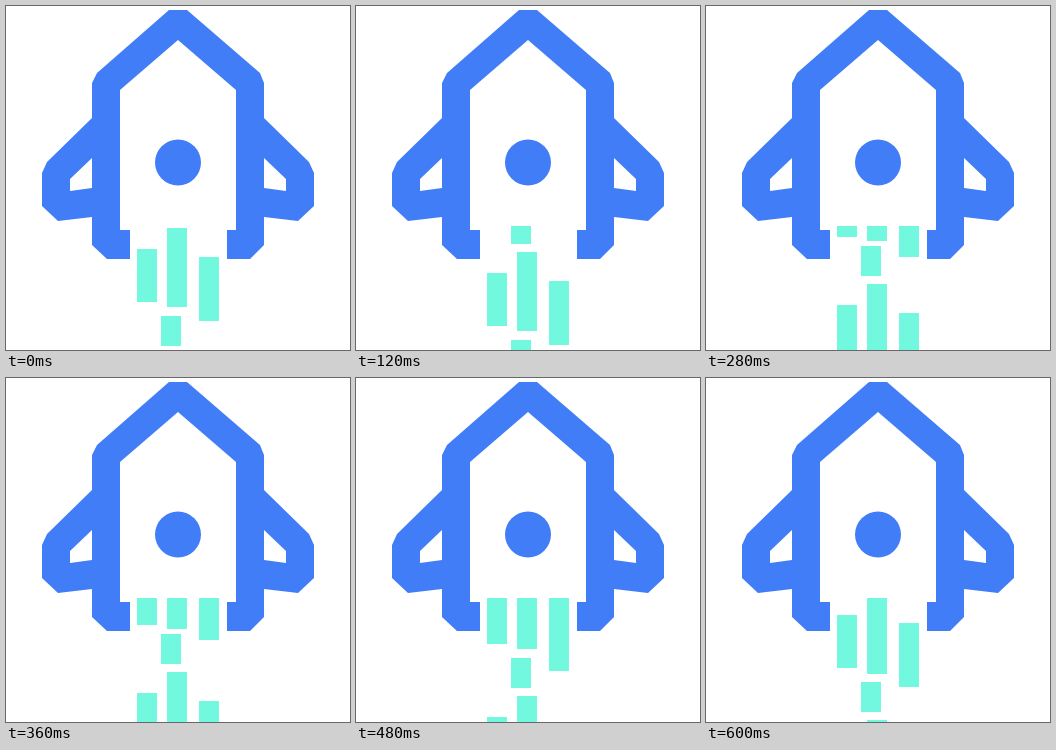
An HTML page that plays this animation: 344 px wide and 344 px high, repeating every 640 ms.

```html
<!DOCTYPE html>
<html lang="en">
<head>
<meta charset="utf-8">
<title>Rocket</title>
<style>
  html, body { margin: 0; width: 100%; height: 100%; overflow: hidden; background: #fff; }
  svg { display: block; width: 100%; height: 100%; }
  .rocket { fill: #427df8; }
  .flame { fill: #72f8de; shape-rendering: crispEdges; }
</style>
</head>
<body>
<svg viewBox="0 0 344 344">
  <g class="rocket">
    <path fill-rule="evenodd" d="M163 4H181L254 67L258 77V112L303 156L308 167V200L292 215L258 211V239L244 253H221V224H230V84L172 34L114 84V224H124V253H101L86 239V211L52 215L36 200V167L41 156L86 112V77L91 67Z
      M86 152L64 173V185L86 182Z M258 152L280 173V185L258 182Z"/>
    <circle cx="172" cy="156.5" r="23"/>
  </g>
  <g class="flame"></g>
</svg>
<script>
  const STEP_MS = 40, STEPS = 16, SPEED = 8, CYCLE = 126;
  const NOZZLE = 220, FLOOR = 344;

  // edge: [step, lower edge] of the bar that grows out of the nozzle
  const bars = [
    { x: 131, y: 243, h: 53, edge: [[6, 223], [9, 247], [12, 266], [15, 290]] },
    { x: 161, y: 222, h: 79, edge: [[6, 227], [9, 251], [12, 271], [15, 296]] },
    { x: 193, y: 251, h: 64, edge: [[6, 243], [7, 251], [9, 262], [12, 293], [15, 309]] },
    { x: 155, y: 310, h: 30, edge: [[0, 214], [15, 334]] }
  ];

  const flame = document.querySelector('.flame');
  function addRect(x) {
    const rect = document.createElementNS('http://www.w3.org/2000/svg', 'rect');
    rect.setAttribute('x', x);
    rect.setAttribute('width', 20);
    return flame.appendChild(rect);
  }
  for (const bar of bars) {
    bar.leaving = addRect(bar.x);
    bar.entering = addRect(bar.x);
  }

  function span(rect, top, bottom) {
    const y = top < NOZZLE + 2 ? NOZZLE : top;
    rect.setAttribute('y', y);
    rect.setAttribute('height', Math.max(0, Math.min(bottom, FLOOR) - y));
  }

  function lowerEdge(keys, step) {
    if (step < keys[0][0]) return NOZZLE;
    const i = Math.max(1, keys.findIndex(key => key[0] >= step));
    const [s0, y0] = keys[i - 1], [s1, y1] = keys[i];
    return Math.round(y0 + (y1 - y0) * (step - s0) / (s1 - s0));
  }

  function draw(now) {
    const step = Math.floor(now / STEP_MS) % STEPS;
    for (const { y, h, edge, leaving, entering } of bars) {
      const top = y + SPEED * step;
      span(leaving, top, top + h);
      span(entering, top - CYCLE, lowerEdge(edge, step));
    }
  }

  function tick(now) {
    draw(Math.max(0, now));
    requestAnimationFrame(tick);
  }
  draw(0);
  requestAnimationFrame(tick);
</script>
</body>
</html>
```
